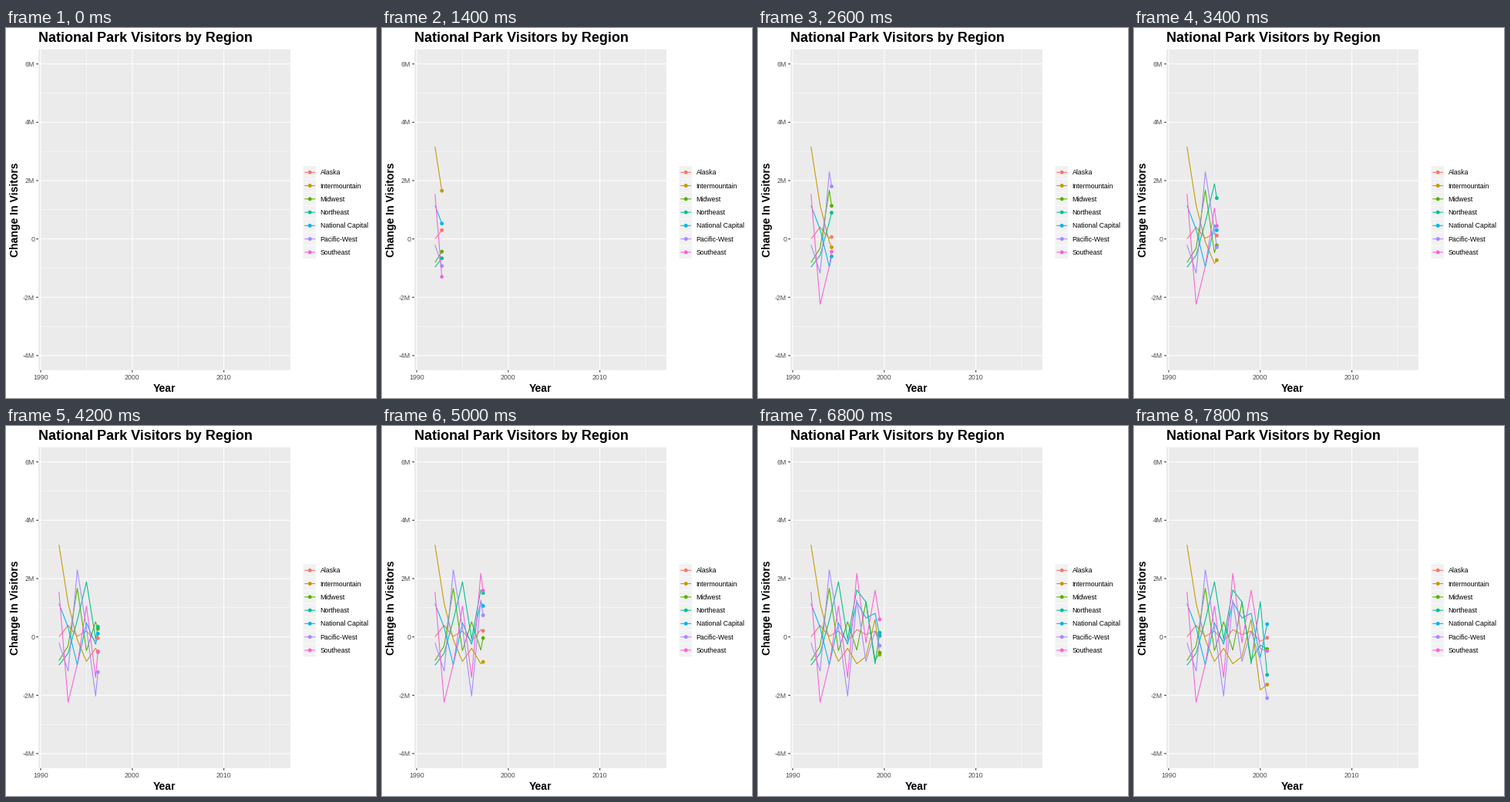
Animation of 480 by 480 pixels, one loop 8 s. Source, as a matplotlib script:

```python
import numpy as np
import matplotlib.pyplot as plt
from matplotlib.animation import FuncAnimation
from matplotlib.patches import Rectangle

SIZE, DPI = 480, 72
FRAMES, INTERVAL = 40, 200
HOLD = 4             # empty frames before the lines start
STEPS_PER_YEAR = 4
START = 1992
LEFT, RIGHT, TOP, BOTTOM = 42.0, 368.8, 27.7, 443.9
KEY_X, KEY_Y, KEY = 385.6, 178.6, 17.28
LINE = 1.07
DOT_AREA = 4.85 ** 2

# Change in visitors, in millions, one value per year
REGIONS = {
    "Alaska": ("#F8766D", [0, .4, .02, .2, -.14, .25, .08, .2, -.15, .01]),
    "Intermountain": ("#C49A00", [3.16, 1.15, -.1, -.84, -.39, -.92, -.67, .6, -1.82, -1.57]),
    "Midwest": ("#53B400", [-.81, -.31, 1.67, -.47, .52, -.45, 1.2, -.8, -.28, -.46]),
    "Northeast": ("#00C094", [-.97, -.56, .57, 1.89, -.07, 1.61, 1.2, -.92, 1.21, -2.14]),
    "National Capital": ("#00B6EB", [1.15, .32, -.96, .48, -.25, 1.2, .65, .81, -.7, .82]),
    "Pacific-West": ("#A58AFF", [-.2, -1.17, 2.3, .3, -2.03, 1.27, -.84, .2, -.8, -2.53]),
    "Southeast": ("#FB61D7", [1.54, -2.24, -.94, 1.06, -1.39, 2.18, -.2, 1.6, -.4, -.51]),
}
COLORS = [color for color, _ in REGIONS.values()]
VALUES = np.array([values for _, values in REGIONS.values()])

plt.rcParams["font.family"] = "Liberation Sans"
fig = plt.figure(figsize=(SIZE / DPI, SIZE / DPI), dpi=DPI, facecolor="white")
ax = fig.add_axes([0, 0, 1, 1])
ax.set_xlim(0, SIZE)
ax.set_ylim(SIZE, 0)
ax.axis("off")


def px(year):
    return LEFT + (np.asarray(year) - 1989.75) / 27.5 * (RIGHT - LEFT)


def py(value):
    return TOP + (6.5 - np.asarray(value)) / 11 * (BOTTOM - TOP)


def line(xs, ys, color, width=LINE, z=2):
    return ax.plot(xs, ys, color=color, lw=width, zorder=z, snap=False,
                   solid_capstyle="butt", solid_joinstyle="round")[0]


def box(x, y, w, h, color):
    ax.add_patch(Rectangle((x, y), w, h, fc=color, lw=0, zorder=0, snap=False))


def label(x, y, text, size=8.8, **style):
    ax.text(x, y, text, fontsize=size, va="baseline", **style)


def draw_panel():
    box(LEFT, TOP, RIGHT - LEFT, BOTTOM - TOP, "#EBEBEB")
    for year in range(1990, 2016, 5):
        x, major = px(year), year % 10 == 0
        line([x, x], [TOP, BOTTOM], "white", LINE if major else LINE / 2, 1)
        if major:
            line([x, x], [BOTTOM, BOTTOM + 2.75], "#333333")
            label(x, 456.2, str(year), color="#4D4D4D", ha="center")
    for value in range(-4, 7):
        y, major = py(value), value % 2 == 0
        line([LEFT, RIGHT], [y, y], "white", LINE if major else LINE / 2, 1)
        if major:
            line([LEFT - 2.75, LEFT], [y, y], "#333333")
            label(37.2, y + 3.2, f"{value}M" if value else "0",
                  color="#4D4D4D", ha="right")
    label(42, 18, "National Park Visitors by Region", 18, weight="bold")
    label(205.4, 472, "Year", 14, weight="bold", ha="center")
    ax.text(16.2, 235.8, "Change In Visitors", fontsize=14, weight="bold",
            rotation=90, rotation_mode="anchor", ha="center", va="baseline")


def draw_legend():
    centers = KEY_Y + KEY * (np.arange(len(REGIONS)) + 0.5)
    for (name, (color, _)), y in zip(REGIONS.items(), centers):
        box(KEY_X, y - KEY / 2 + .4, KEY - .8, KEY - .8, "#F2F2F2")
        line([KEY_X + .1 * KEY, KEY_X + .9 * KEY], [y, y], color)
        label(407.7, y + 3.1, name, color="black")
    ax.scatter(np.full(len(centers), KEY_X + KEY / 2), centers,
               s=DOT_AREA, c=COLORS, lw=0, zorder=4)


draw_panel()
draw_legend()
trails = [line([], [], color, z=3) for color in COLORS]
heads = ax.scatter(np.zeros(len(COLORS)), np.zeros(len(COLORS)),
                   s=DOT_AREA, c=COLORS, lw=0, zorder=4)


def update(frame):
    elapsed = (frame - HOLD) / STEPS_PER_YEAR
    visible = elapsed >= 0
    heads.set_visible(visible)
    for trail in trails:
        trail.set_visible(visible)
    if visible:
        years = np.arange(VALUES.shape[1])
        times = np.append(years[years < elapsed], elapsed)
        xs = px(START + times)
        ends = []
        for trail, values in zip(trails, VALUES):
            ys = py(np.interp(times, years, values))
            trail.set_data(xs, ys)
            ends.append((xs[-1], ys[-1]))
        heads.set_offsets(ends)
    return [*trails, heads]


anim = FuncAnimation(fig, update, frames=FRAMES, interval=INTERVAL,
                     repeat=True, repeat_delay=0, blit=False)
plt.show()
```
